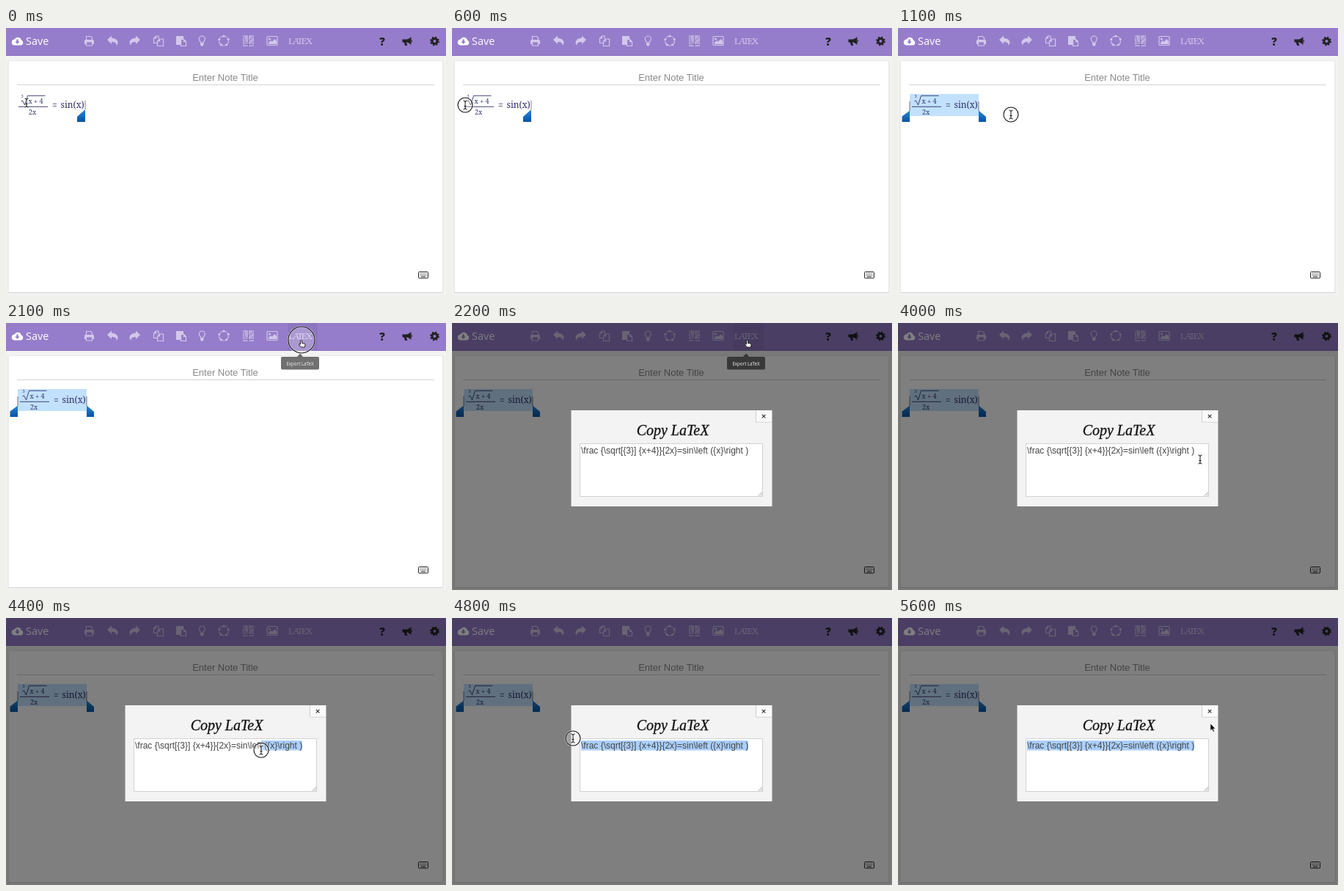
Recreate the animation shown at these times as an HTML page. Size 600 by 364 pixels, loop 5700 ms.

```html
<!DOCTYPE html>
<html lang="en">
<head>
<meta charset="utf-8">
<title>Copy LaTeX</title>
<style>
html, body { margin: 0; width: 100%; height: 100%; overflow: hidden; background: #f3f3f3; }
svg { display: block; width: 600px; height: 364px; }
text { font-family: "Liberation Sans", Arial, sans-serif; white-space: pre; }
.ui { font-family: "Open Sans", sans-serif; }
.math text { font-family: "Noto Serif", serif; }
.serif { font-family: "Liberation Serif", serif; }
.mid { text-anchor: middle; }
.line { fill: none; stroke: currentColor; stroke-width: 1.2; }
</style>
</head>
<body>
<svg viewBox="0 0 600 364">
  <defs>
    <linearGradient id="blue" x2="0" y2="1">
      <stop stop-color="#2b86d6"/><stop offset="1" stop-color="#0753a3"/>
    </linearGradient>
  </defs>
  <rect width="600" height="364" fill="#f3f3f3"/>
  <rect x="2.5" y="44.5" width="594" height="317" rx="1" fill="#ddd"/>
  <rect x="3.5" y="45" width="592" height="315" fill="#fff"/>
  <rect width="600" height="38" fill="#967dcb"/>
  <rect y="37" width="600" height="1" fill="#8a71c0"/>

  <!-- save -->
  <path d="M11 23.5h9a3.5 3.5 0 0 0 .9-6.8A5 5 0 0 0 11.6 15.400A4.100 4.100 0 0 0 11 23.500z" fill="#fff"/>
  <path d="M14.300 15.500h2.400v3h2l-3.200 3.300-3.200-3.300h2z" fill="#967dcb"/>
  <text class="ui" x="27" y="23" font-size="14.5" fill="#fff">Save</text>

  <rect id="hover" x="384" y="0" width="41" height="38" fill="#8d75c0"/>
  <!-- tools -->
  <g color="#d3c7ea" fill="#d3c7ea">
    <path class="line" d="M109.500 16v-4.500h6l2 2V16M109.500 20v4h8v-4"/>
    <path d="M107 17.500q0-1.500 1.500-1.500h10q1.500 0 1.500 1.500V22h-2.500v-2.500h-8V22H107z"/>
    <path id="undo" d="M138 16l6-5.500v3.300c5 0 8.500 2.700 8.500 6 0 1.700-.700 3.200-2 4.200 .600-3.400-1.500-5-6.500-5v3z"/>
    <use href="#undo" transform="matrix(-1 0 0 1 321 0)"/>
    <path class="line" d="M206 20.500h-4.500V14l3-3h3.500v4M204.500 11v3h-3M206.500 24.500V18l3-3h5v9.500zM209.500 15v3h-3"/>
    <path d="M232 11h10v4h-4v8h-6z"/>
    <path class="line" d="M238.500 24.500v-9h4l3 3v6zM242.500 15.500v3h3"/>
    <path class="line" d="M265.500 20c0-2-2.200-2.500-2.200-5a4 4 0 0 1 8 0c0 2.500-2.200 3-2.200 5z"/>
    <path d="M265 20.500h4.500V23l-1.200 1.500h-2L265 23z"/>
    <circle class="line" cx="297" cy="17.500" r="6.500" stroke-dasharray="4 1"/>
    <g id="dots"></g>
    <rect x="323" y="10" width="15" height="15" opacity=".65"/>
    <path d="M323 22.500h15M330.500 10v15M324 11c2 10 5 12 7 7s4-1 6-7M324 18c3 7 10 7 13 0" fill="none" stroke="#856bb9" stroke-width=".8"/>
    <rect class="line" x="356" y="11.500" width="14" height="12" rx="1"/>
    <circle cx="359.500" cy="15" r="1.500"/>
    <path d="M358 22v-2l3-3 1.800 1.800 3.600-3.800 2.600 3v4z"/>
    <text class="serif" x="385" y="22" font-size="13" letter-spacing="-2">LATEX</text>
  </g>
  <g fill="#222">
    <text class="ui mid" x="513" y="23.500" font-size="15" font-weight="800">?</text>
    <path d="M540.500 15.500h5c3 0 5.500-2 7-3.500v11c-1.500-1.500-4-3.500-6.500-3.500l1.200 4.500h-3l-1.500-4.500h-2.200zM553 16a2 2 0 0 1 0 3.500z"/>
    <circle cx="584.500" cy="18" r="3.500" fill="none" stroke="#222" stroke-width="3"/>
    <circle cx="584.500" cy="18" r="5.400" fill="none" stroke="#222" stroke-width="2" stroke-dasharray="2.240 2"/>
  </g>

  <text class="mid" x="299" y="71.500" font-size="13" fill="#8a8a8a">Enter Note Title</text>
  <path d="M15 77.500H584" stroke="#d4d4d4"/>

  <!-- formula -->
  <rect id="mark" x="16" y="90" height="30" fill="#c2e1fd"/>
  <g id="math" class="math" fill="#30306a" color="#30306a">
    <text x="20.500" y="95" font-size="5.500">3</text>
    <path class="line" d="M20.500 100l2-1 3 6 4-12.700H53.500" stroke-width=".9" style="stroke-width:.9"/>
    <text x="30.500" y="102.500" font-size="9">x + 4</text>
    <path d="M17 107.300H57" stroke="currentColor" stroke-width=".9"/>
    <text x="31" y="118" font-size="9">2x</text>
    <text x="63" y="109.500" font-size="12">=</text>
    <text x="74.500" y="109" font-size="12">sin(x)</text>
  </g>
  <g id="caret">
    <path d="M108 99v12" stroke="#666" stroke-width=".8"/>
    <path d="M108 111v17H97v-7z" fill="url(#blue)"/>
  </g>
  <g id="grips">
    <path d="M16 100v13" stroke="#555" stroke-width=".8"/>
    <path d="M16 112.500V128H5.500v-7.500z" fill="url(#blue)"/>
    <g id="end">
      <path d="M0 100v13" stroke="#555" stroke-width=".8"/>
      <path d="M0 112.500V128h10v-7z" fill="url(#blue)"/>
    </g>
  </g>

  <!-- keyboard -->
  <g stroke="#222" fill="none">
    <rect x="562.500" y="332.500" width="13" height="8.500" rx="1"/>
    <path d="M564.500 335h9M564.500 337h9" stroke-dasharray="1 1"/>
    <path d="M566 339h6"/>
  </g>

  <g id="modal">
    <rect width="600" height="364" opacity=".5"/>
    <rect x="162.500" y="119" width="274" height="131" fill="#f3f3f3"/>
    <path d="M414.500 119v16H436" fill="none" stroke="#ccc"/>
    <rect x="415" y="119" width="21" height="15.500" fill="#fafafa"/>
    <path d="M422.800 124.800l4.600 4.600m0-4.600l-4.600 4.600" stroke="#333" stroke-width="1.200"/>
    <text class="serif mid" x="301" y="153" font-size="20" font-style="italic" stroke="#111" stroke-width=".3" fill="#111">Copy LaTeX</text>
    <rect x="174.500" y="164.500" width="249" height="72" fill="#fff" stroke="#d2d2d2"/>
    <path d="M418 235.500l5-5M421 235.500l2-2" stroke="#777" stroke-width=".8"/>
    <rect id="picked" y="167" height="13.500" fill="#aacffb"/>
    <text x="176" y="177.500" font-size="12" fill="#444">\frac {\sqrt[{3}] {x+4}}{2x}=sin\left ({x}\right )</text>
  </g>

  <g id="tip">
    <path d="M377 46h20l4-4.500 4 4.500h20q2 0 2 2v13.500q0 2-2 2h-48q-2 0-2-2V48q0-2 2-2z" opacity=".56"/>
    <text class="ui mid" x="401" y="57.500" font-size="6.200" fill="#f4f4f4">Export LaTeX</text>
  </g>

  <g id="pointer">
    <g id="ring">
      <circle id="halo" fill="#fff" fill-opacity=".25" stroke="#fff" stroke-opacity=".5" stroke-width="2.600"/>
      <circle id="rim" fill="none" stroke="#111" stroke-width="1.100"/>
    </g>
    <g id="beam" fill="none">
      <path id="stem" d="M-2.500-6Q0-6 0-4V4Q0 6-2.500 6M2.500-6Q0-6 0-4M0 4Q0 6 2.500 6M-1.500 1.500h3" stroke="#fff" stroke-width="2.200" stroke-opacity=".6"/>
      <path d="M-2.500-6Q0-6 0-4V4Q0 6-2.500 6M2.500-6Q0-6 0-4M0 4Q0 6 2.500 6M-1.500 1.500h3" stroke="#111"/>
    </g>
    <path id="arrow" d="M0 0v9.500l2.200-2 1.700 3.700 1.500-.700-1.600-3.600h3z" stroke="#fff" stroke-width=".5"/>
    <path id="hand" d="M-1.500 1q1-1.200 2 0v3.500l3.500.600q1.300.400 1 2L4.300 10H-.700l-3-3.800q.500-1.500 2.200 0z" fill="#fff" stroke="#111" stroke-width=".9"/>
  </g>
</svg>
<script>
const $ = id => document.getElementById(id);
const show = (id, on) => $(id).style.display = on ? "" : "none";
const set = (id, name, value) => $(id).setAttribute(name, value);

for (let i = 0; i < 5; i++) {
  const a = (i * 72 - 90) * Math.PI / 180;
  $("dots").innerHTML += `<circle cx="${297 + 6.5 * Math.cos(a)}" cy="${17.5 + 6.5 * Math.sin(a)}" r="1.500"/>`;
}

// pointer stops: time, x, y
const stops = [
  [0, 28, 102], [500, 18, 105], [600, 18, 105], [1100, 154, 118],
  [1200, 154, 118], [1800, 403, 23], [2400, 403, 23], [2600, 388, 92],
  [2700, 388, 92], [3300, 340, 190], [3500, 340, 190], [4000, 412, 186],
  [4200, 412, 186], [4800, 165, 164], [4900, 165, 164], [5300, 223, 172],
  [5600, 426, 144], [5700, 426, 144]
];

function place(t) {
  const i = stops.findIndex(s => s[0] > t);
  const [t0, x0, y0] = stops[i - 1], [t1, x1, y1] = stops[i];
  const u = (t - t0) / (t1 - t0), k = u * u * (3 - 2 * u);
  return [x0 + (x1 - x0) * k, y0 + (y1 - y0) * k];
}

function draw(t) {
  const [x, y] = place(t);
  const within = (a, b) => t >= a && t < b;
  const marked = t >= 700, open = t >= 2200;
  const dragging = within(600, 1200) || within(4200, 4900);
  const clicking = within(1900, 2200);

  const end = t < 1200 ? Math.max(20, Math.min(110, x)) : 110;
  show("mark", marked);
  show("grips", marked);
  show("caret", !marked);
  set("mark", "width", end - 16);
  set("end", "transform", `translate(${end})`);
  set("math", "transform", `translate(${marked ? 2 : 0})`);

  show("hover", within(1800, 2500));
  show("tip", within(1900, 2500));
  show("modal", open);
  const from = t < 4300 ? 404 : t < 4800 ? Math.max(176, Math.min(404, x)) : 176;
  set("picked", "x", from);
  set("picked", "width", 404 - from);

  const overText = open ? x > 175 && x < 424 && y > 165 && y < 237 : y > 83;
  const kind = dragging || overText ? "beam" : within(1800, 2500) ? "hand" : "arrow";
  for (const id of ["beam", "hand", "arrow"]) show(id, id === kind);
  show("ring", dragging || clicking);
  const r = clicking ? 10 + (t - 1900) / 25 : 10;
  set("halo", "r", r);
  set("rim", "r", r);
  set("pointer", "transform", `translate(${x} ${y})`);
}

function tick(now) {
  draw(Math.floor(now % 5700 / 100) * 100);
  requestAnimationFrame(tick);
}
draw(0);
requestAnimationFrame(tick);
</script>
</body>
</html>
```
